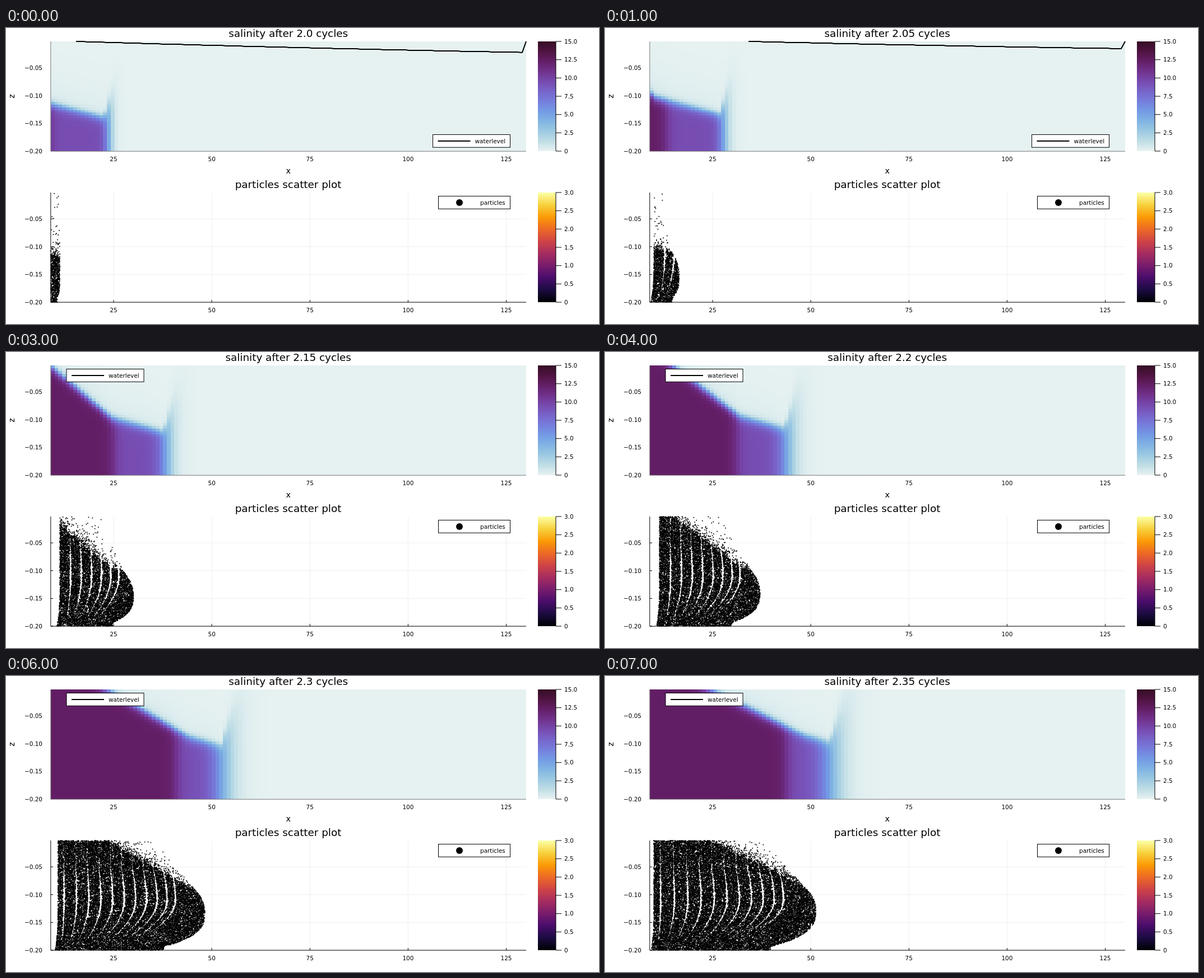
An HTML page with a canvas that plays this animation: 1058 by 529 pixels, repeating every 8 s.

```html
<!DOCTYPE html>
<html lang="en">
<head>
<meta charset="utf-8">
<title>salinity and particles</title>
<style>
html, body { margin: 0; width: 100%; height: 100%; overflow: hidden; background: #fff; }
canvas { display: block; }
</style>
</head>
<body>
<canvas id="stage" width="1058" height="529"></canvas>
<script>
const c = document.getElementById('stage').getContext('2d');
const L = 80, R = 928, TOP = 24, H = 196, SHIFT = 270;
const SMALL = 10.45, MEDIUM = 14.4, LARGE = 18.35;

const hex = s => s.split(' ').map(h => [0, 2, 4].map(i => parseInt(h.substr(i, 2), 16)));
const dense = hex('e6f1f1 bfdde5 9cc9e2 81b4e3 739ae4 757fdd 7864ca 774aaf 71328d 641f68 501442 360e24');
const inferno = hex('000004 1b0c41 4a0c6b 781c6d a52c60 cf4446 ed6925 fb9b06 f7d13d fcffa4');

const clamp = (v, lo, hi) => Math.min(Math.max(v, lo), hi);
const logistic = v => 1 / (1 + Math.exp(-v));

function shade(map, v) {
  const p = clamp(v, 0, 1) * (map.length - 1);
  const i = Math.min(Math.floor(p), map.length - 2);
  return `rgb(${map[i].map((a, n) => Math.round(a + (map[i + 1][n] - a) * (p - i)))})`;
}

function random(seed) {
  return () => {
    seed = (seed + 0x6D2B79F5) | 0;
    let r = Math.imul(seed ^ (seed >>> 15), seed | 1);
    r ^= r + Math.imul(r ^ (r >>> 7), r | 61);
    return ((r ^ (r >>> 14)) >>> 0) / 4294967296;
  };
}

function text(s, x, y, size = SMALL, align = 'center') {
  c.font = `${size}px "DejaVu Sans", sans-serif`;
  c.textAlign = align;
  c.fillStyle = '#000';
  c.fillText(s, x, y);
}

function line(pts, width = 1, color = '#000') {
  c.beginPath();
  pts.forEach(p => c.lineTo(...p));
  c.lineWidth = width;
  c.strokeStyle = color;
  c.stroke();
}

function box(x, y, w, h) {
  c.fillStyle = '#fff';
  c.fillRect(x, y, w, h);
  c.lineWidth = 1;
  c.strokeStyle = '#000';
  c.strokeRect(x, y, w, h);
}

const xTicks = [25, 50, 75, 100, 125].map(v => [v, 192 + (v - 25) * 7.005]);
const yTicks = [0.05, 0.1, 0.15, 0.2].map(v => [v, 21.5 + v * 993]);

function labels(top) {
  xTicks.forEach(([v, x]) => text(v, x, top + 214.3));
  yTicks.forEach(([v, y]) => text('\u2212' + v.toFixed(2), 65, y + top - TOP + 3.8, SMALL, 'right'));
}

function colorbar(map, top, max, step) {
  for (let y = 0; y < H; y++) {
    c.fillStyle = shade(map, 1 - y / (H - 1));
    c.fillRect(949, top + y, 32, 1);
  }
  line([[981, top], [981, top + H]]);
  for (let v = 0; v <= max; v += step) {
    const y = top + H * (1 - v / max);
    line([[981, y], [991, y]]);
    text(v ? v.toFixed(1) : '0', 996, y + 3.7, SMALL, 'left');
  }
}

// The tide carries both the salt front and the particle cloud
const tide = k => Math.sin(Math.PI / 10 * (k - 2.9));
const saltFront = k => 289 + 129 * tide(k);

// Salinity near the bottom, u pixels past the front
function bottomSalt(u, k) {
  const spread = 5 + 1.3 * k;
  return 9.4 * logistic(-u / spread - 0.8) + 3 * logistic(-(u + 110 - 3 * k) / 6);
}

// Height of the boundary between salt and fresh water
function halocline(u, k) {
  const back = Math.max(-u, 12), knee = 140 - 12 * k;
  return 161 - 6 * k - 0.27 * (back - 12) - (0.85 - 0.09 * k) * Math.max(0, back - knee);
}

function heatmap(k) {
  const cols = 127, rows = 40, w = (R - L) / cols, h = H / rows;
  for (let i = 0; i < cols; i++) {
    const u = L + (i + 0.5) * w - saltFront(k), past = Math.max(0, u + 12);
    const salt = bottomSalt(u, k), edge = halocline(u, k) - 2.6 * past;
    const blur = 15 * Math.min(1, past / 24);
    const x0 = Math.round(L + i * w), x1 = Math.round(L + (i + 1) * w);
    for (let j = 0; j < rows; j++) {
      const d = TOP + (j + 0.5) * h - edge;
      const body = logistic(d / ((d < 0 ? 3 : 5) + blur));
      const haze = d < 0 ? 0.06 * Math.exp(d / 28) * (1 - body) : 0;
      const y0 = Math.round(TOP + j * h), y1 = Math.round(TOP + (j + 1) * h);
      c.fillStyle = shade(dense, salt * (body + haze) / 15);
      c.fillRect(x0, y0, x1 - x0, y1 - y0);
    }
  }
}

function waterline(k) {
  if (k > 2) return;
  const start = 125 + 131 * k, drop = 19.6 - 6.8 * k, end = 921;
  const pts = [[start, TOP]];
  for (let x = start + 6.7; x < end; x += 6.677) {
    const f = (x - start) / (end - start);
    pts.push([x, TOP + Math.round(drop * (1.25 * f - 0.25 * f * f))]);
  }
  pts.push([end, TOP + drop], [R, TOP]);
  line(pts, 2);
}

function particles(k) {
  const rnd = random(7 + k);
  const left = 97 - 1.1 * (k - 4) ** 2, front = 222.5 + 160 * tide(k), depth = 446 - 4 * k;
  const reach = front - left, grown = clamp((front - 96) / 50, 0, 1), slope = 0.9 * (front - 96) / 280;

  const rightEdge = y => {
    if (y > depth) return front - 0.28 * reach * Math.min(1, (y - depth) / (484 - depth)) ** 3;
    const top = Math.max(y, 391);
    return front - grown * 8 * ((depth - top) / 28) ** 2 - slope * (top - y);
  };

  // Each pause in the release leaves a white streak, two per step at first
  const count = Math.min(2 * k, 10.5), streaks = [];
  for (let j = 0; j < count; j++) streaks.push(0.8 * reach * (1 - (j / count) ** 1.12));
  const bend = y => y > 400 ? 1 - 0.27 * ((y - 400) / 65) ** 2 : 1 - 0.04 * Math.min(1, (400 - y) / 55) ** 2;
  const inStreak = (x, y) => {
    if (y > 472) return false;
    const half = (0.45 + 1.5 * Math.exp(-(((y - 400) / 48) ** 2))) * (0.7 + 0.6 * rnd());
    return streaks.some(s => s > 8 && Math.abs(x - left - s * bend(y)) < half);
  };

  c.fillStyle = '#000';
  const tries = (front - L) * H * 0.78;
  for (let i = 0; i < tries; i++) {
    const x = L + rnd() * (front - L), y = 294 + rnd() * H, keep = rnd();
    const leftEdge = left - 5 * (Math.max(0, y - 430) / 60) ** 2;
    if (x < leftEdge || x > rightEdge(y)) continue;
    const above = halocline(x - saltFront(k), k) + SHIFT - y;
    if (above > 0 && keep > 0.6 * Math.exp(-above / 7) + 0.035 * Math.exp(-above / 70)) continue;
    if (!inStreak(x, y)) c.fillRect(x - 0.85, y - 0.85, 1.7, 1.7);
  }
}

function salinityPlot(k) {
  const cycles = 2 + k * 5 / 100;
  text(`salinity after ${k ? cycles : '2.0'} cycles`, 503.7, 16, LARGE);
  heatmap(k);
  line([[79.8, TOP], [79.8, 220.3], [R, 220.3]], 1, '#777');
  waterline(k);
  labels(TOP);
  text('x', 503.7, 260, MEDIUM);
  c.save();
  c.translate(15, 122);
  c.rotate(-Math.PI / 2);
  text('z', 0, 0, MEDIUM);
  c.restore();
  const [x, y] = k < 2 ? [761.5, 190.5] : [108, 30.5];
  box(x, y, 138, 22.8);
  line([[x + 9, y + 11.5], [x + 67, y + 11.5]], 2);
  text('waterlevel', x + 75, y + 15.3, SMALL, 'left');
  colorbar(dense, TOP, 15, 2.5);
}

function particlePlot(k) {
  const top = TOP + SHIFT, base = top + H + 0.1;
  text('particles scatter plot', 503.5, 286, LARGE);
  xTicks.forEach(([, x]) => line([[x, top], [x, base]], 1, '#efefef'));
  yTicks.forEach(([, y]) => line([[L, y + SHIFT], [R, y + SHIFT]], 1, '#efefef'));
  line([[79.8, top], [79.8, base], [R, base]]);
  xTicks.forEach(([, x]) => line([[x, base], [x, base - 4]]));
  yTicks.forEach(([, y]) => line([[L, y + SHIFT], [L + 4, y + SHIFT]]));
  particles(k);
  labels(top);
  box(771.5, 300.5, 128, 22.8);
  c.fillStyle = '#000';
  c.beginPath();
  c.arc(809, 312, 6, 0, 7);
  c.fill();
  text('particles', 846, 315.8, SMALL, 'left');
  colorbar(inferno, top, 3, 0.5);
}

let shown = -1;
const began = performance.now();
function tick() {
  const step = Math.floor((performance.now() - began) / 1000) % 8;
  if (step !== shown) {
    shown = step;
    c.fillStyle = '#fff';
    c.fillRect(0, 0, 1058, 529);
    salinityPlot(step);
    particlePlot(step);
  }
  requestAnimationFrame(tick);
}
tick();
</script>
</body>
</html>
```
